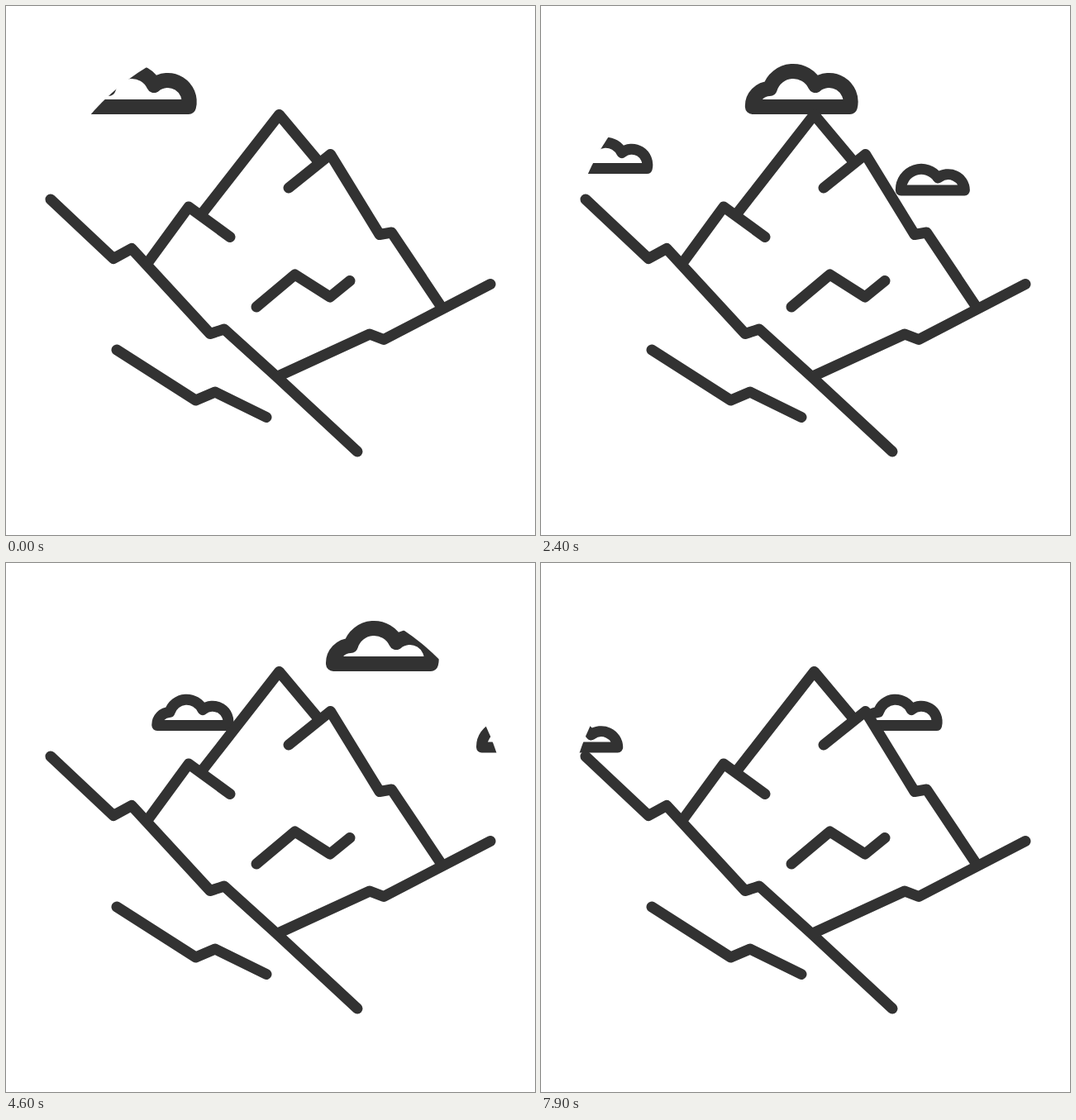
Animation of 640x640 px, one loop 8 s. Source, as an HTML page:

```html
<!DOCTYPE html>
<html lang="en">
<head>
<meta charset="utf-8">
<title>Clouds over a mountain</title>
<style>
  html, body { margin: 0; width: 100%; height: 100%; overflow: hidden; background: #fff; }
  svg { display: block; width: 100vw; height: 100vh; }
  path { fill: none; stroke: #323232; stroke-width: 13; stroke-linecap: round; stroke-linejoin: round; }
  .land { fill: #fff; stroke: none; }
  .large { stroke-width: 18; }
</style>
</head>
<body>
<svg viewBox="0 0 640 640">
  <defs>
    <clipPath id="sky"><circle cx="320" cy="320" r="288"/></clipPath>
    <path id="puffy" class="large" d="M9 122A21 21 0 0 1 30 100A29.5 29.5 0 0 1 85 96A26 26 0 0 1 127 122Z"/>
    <path id="low" d="M6.5 223A24.7 24.7 0 0 1 51.5 208A19.7 19.7 0 0 1 83.5 223Z"/>
  </defs>

  <g clip-path="url(#sky)">
    <!-- data-x: left edge at time zero -->
    <g class="cloud" data-x="94"><use href="#puffy"/></g>
    <g class="cloud" data-x="-116.7"><use href="#puffy" transform="translate(0 108) scale(.725)"/></g>
    <g class="cloud" data-x="276"><use href="#low"/></g>
    <g class="cloud" data-x="-494"><use href="#low"/></g>
  </g>

  <path class="land" d="M172 310L221 243L238 250L331 131L377 187L393 179L452 276L467 273L526 363L327 448L247 396Z"/>
  <path d="M54 234L130 305.500L152 293.500L247 396.500L264 391L327 448L425 539"/>
  <path d="M172 310L221 243L271 279.500M238 250L330.500 131.500L377 187"/>
  <path d="M342 220L392.500 179.500L452 276.500L466.500 274L526 363"/>
  <path d="M329 448L440 397L457 403.500L586 336.500"/>
  <path d="M303 364L349.500 325L392 352L416 332.500"/>
  <path d="M134 416L229.500 477L253 467L315 497.500"/>
</svg>
<script>
  const LOOP = 8000, STEP = 100, SPEED = 0.0637; // ms, ms, px per ms
  const clouds = document.querySelectorAll('.cloud');
  const start = performance.now();

  function draw(now) {
    const elapsed = Math.max(0, now - start) % LOOP;
    const shift = Math.floor(elapsed / STEP) * STEP * SPEED;
    for (const cloud of clouds) {
      cloud.setAttribute('transform', `translate(${+cloud.dataset.x + shift} 0)`);
    }
    requestAnimationFrame(draw);
  }
  draw(start);
</script>
</body>
</html>
```
